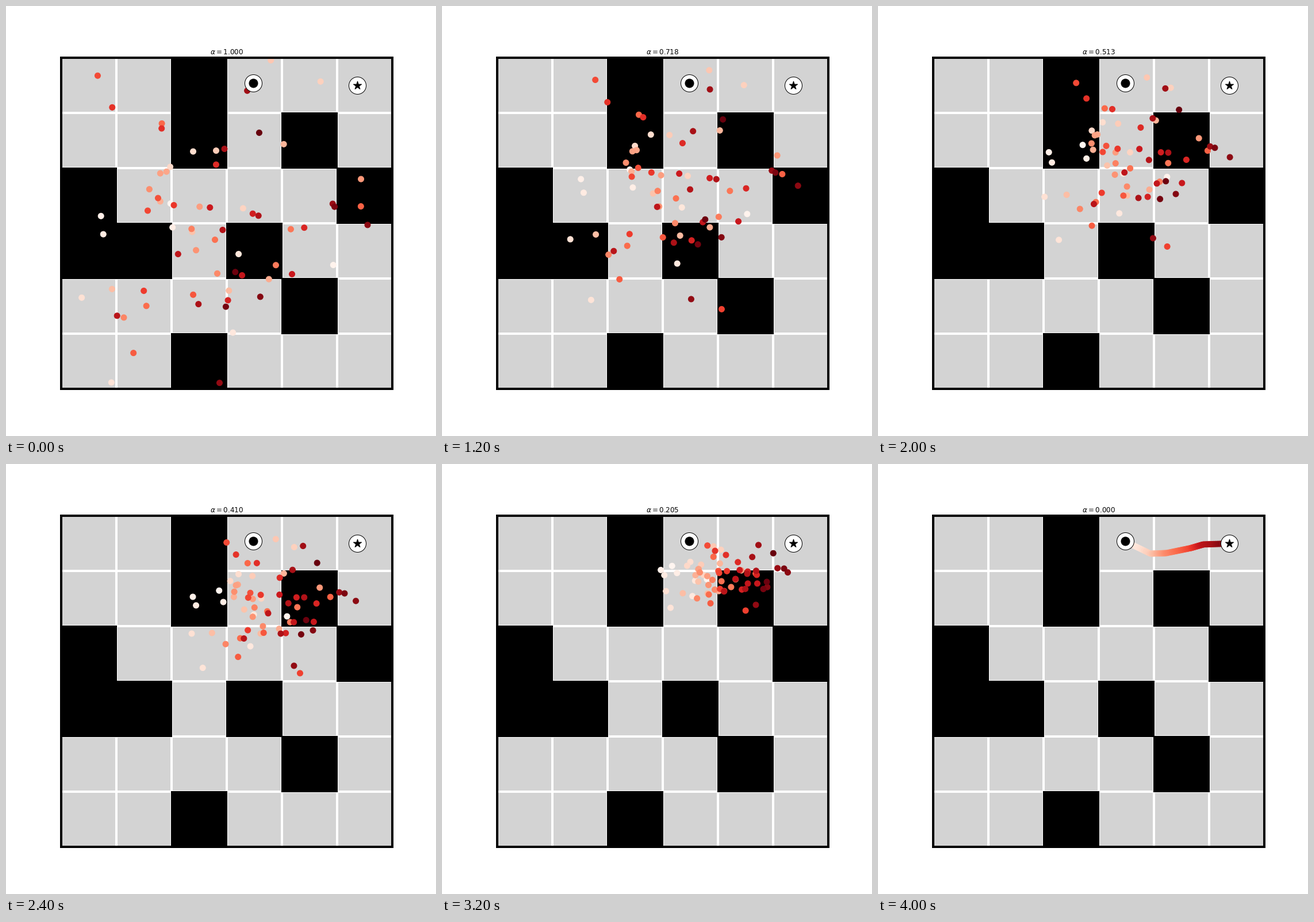
Recreate the animation shown at these times as a matplotlib script. Size 748 px wide and 748 px high, loop 5.1 s.

```python
import matplotlib.pyplot as plt
import numpy as np
from matplotlib.animation import FuncAnimation
from matplotlib.patches import Rectangle

SIZE, DPI = 748, 72
STEPS = 39
FRAMES, INTERVAL = 51, 100
N_CELLS, CELL = 6, 96
LEFT, TOP = 96, 90
SIDE = N_CELLS * CELL
WALLS = {(0, 2), (1, 2), (1, 4), (2, 0), (2, 5), (3, 0), (3, 1), (3, 3), (4, 4), (5, 2)}
START, GOAL = (429.6, 134.4), (611.3, 138.4)
BENDS = [(474, 156), (501.5, 155), (543.5, 146.4), (566, 139.9)]
N_DOTS = 68
NOISE_CENTER, NOISE_SPREAD = (359, 387), (121, 128)


def polyline(vertices, count):
    """Points along the vertices, with the same number on every segment."""
    vertices = np.array(vertices)
    at = np.linspace(0, len(vertices) - 1, count)
    return np.column_stack([np.interp(at, range(len(vertices)), v) for v in vertices.T])


def gaussian_cloud(count, center, spread, seed):
    """Normal samples rescaled to exactly the given mean and deviation."""
    cloud = np.random.default_rng(seed).normal(size=(count, 2))
    cloud = (cloud - cloud.mean(axis=0)) / cloud.std(axis=0)
    return center + cloud * spread


path = polyline([START, *BENDS, GOAL], N_DOTS)
noise = gaussian_cloud(N_DOTS, NOISE_CENTER, NOISE_SPREAD, seed=4)

fig = plt.figure(figsize=(SIZE / DPI, SIZE / DPI), dpi=DPI, facecolor="white")
ax = fig.add_axes([LEFT / SIZE, 1 - (TOP + SIDE) / SIZE, SIDE / SIZE, SIDE / SIZE])
# Data coordinates are pixels measured from the top left of the stage.
ax.set(xlim=(LEFT, LEFT + SIDE), ylim=(TOP + SIDE, TOP), xticks=[], yticks=[])
for spine in ax.spines.values():
    spine.set_linewidth(4)


def add_cell(row, col, **style):
    corner = (LEFT + col * CELL, TOP + row * CELL)
    ax.add_patch(Rectangle(corner, CELL, CELL, **style))


for row in range(N_CELLS):
    for col in range(N_CELLS):
        add_cell(row, col, fc="lightgray", ec="white", lw=4, zorder=0.5)
for row, col in WALLS:
    add_cell(row, col, fc="black", ec="black", lw=2, zorder=0.6)

dots = ax.scatter(*noise.T, s=100, c=np.arange(N_DOTS), cmap="Reds", zorder=2)
for place, symbol in ((START, "o"), (GOAL, "*")):
    ax.scatter(*place, s=900, c="white", edgecolors="black", linewidths=1, zorder=4)
    ax.scatter(*place, s=225, c="black", marker=symbol, zorder=5)
title = ax.set_title("", fontsize=12, pad=6)


def draw(frame):
    alpha = 1 - min(max(frame - 1, 0), STEPS) / STEPS
    dots.set_offsets(alpha * noise + (1 - alpha) * path)
    title.set_text(rf"$\alpha = {alpha:.3f}$")
    return dots, title


anim = FuncAnimation(fig, draw, frames=FRAMES, interval=INTERVAL, repeat=True, repeat_delay=0)
plt.show()
```
